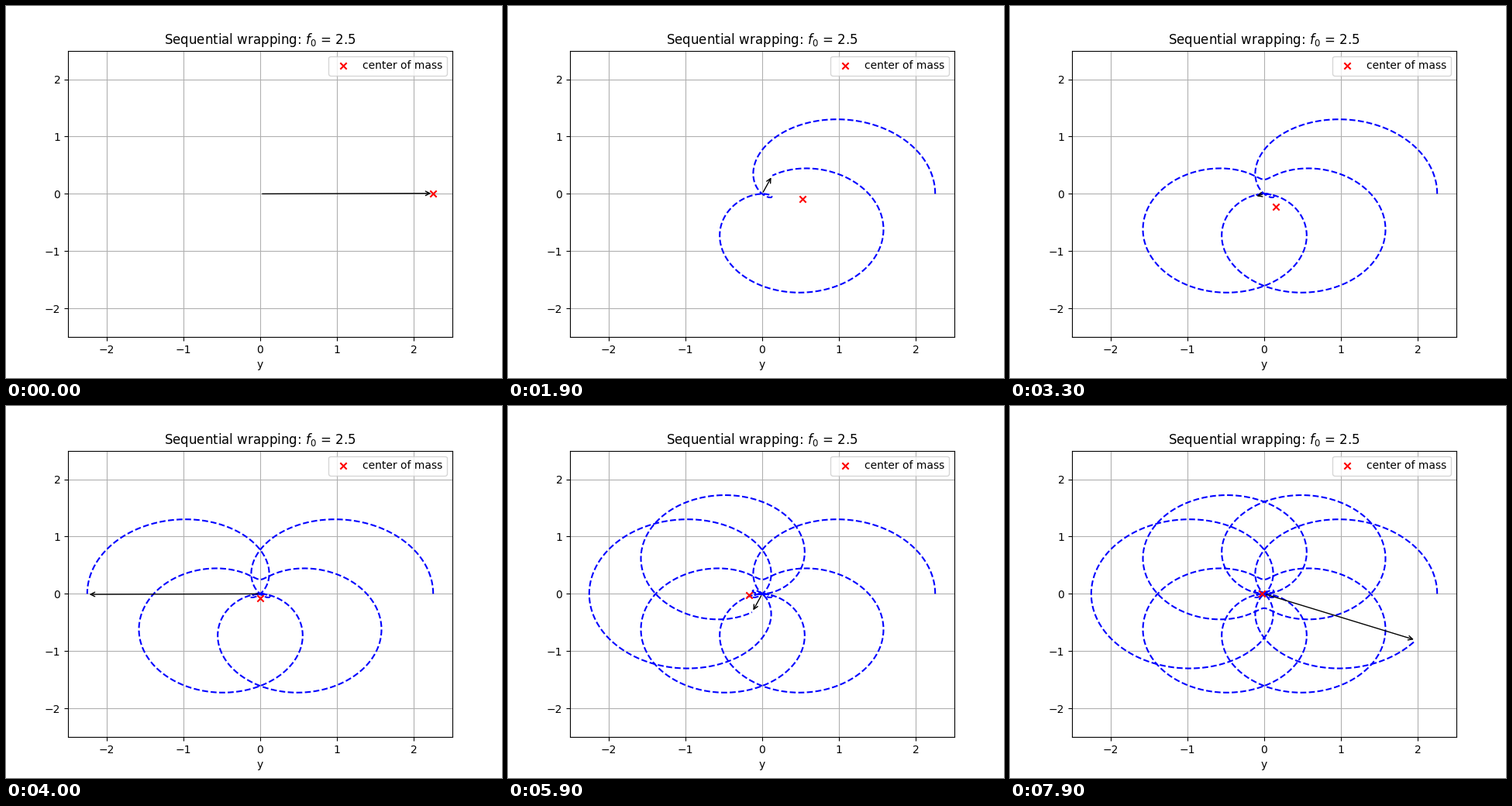
Write a matplotlib script that moves like this. It is 640x480 px and loops after 8000 ms.

```python
import numpy as np
import matplotlib.pyplot as plt
from matplotlib.animation import FuncAnimation

F0 = 2.5          # wrapping frequency
FRAMES = 80
STEP = 100        # samples per frame
DURATION = 2.0

t = np.arange(FRAMES * STEP + 1) * DURATION / (FRAMES * STEP)
signal = 1 + np.cos(2 * np.pi * 3 * t) + 0.25 * np.cos(2 * np.pi * 2 * t)
wrapped = signal * np.exp(2j * np.pi * F0 * t)
centers = np.cumsum(wrapped) / np.arange(1, len(t) + 1)

fig, ax = plt.subplots(figsize=(6.4, 4.8), dpi=100)
ax.set(xlim=(-2.5, 2.5), ylim=(-2.5, 2.5), xlabel="y",
       title=f"Sequential wrapping: $f_0$ = {F0}")
ax.set_xticks(range(-2, 3))
ax.set_yticks(range(-2, 3))
ax.grid(True)

curve, = ax.plot([], [], "b--", lw=1.5)
arrow = ax.annotate("", xy=(1, 0), xytext=(0, 0),
                    arrowprops=dict(arrowstyle="->"))
center = ax.scatter([0], [0], marker="x", color="red", zorder=4,
                    label="center of mass")
ax.legend(loc="upper right")


def update(frame):
    end = frame * STEP
    path = wrapped[:end + 1]
    tip = wrapped[end + 1]
    curve.set_data(path.real, path.imag)
    arrow.xy = (tip.real, tip.imag)
    center.set_offsets([[centers[end].real, centers[end].imag]])
    return curve, arrow, center


anim = FuncAnimation(fig, update, frames=FRAMES, interval=100,
                     repeat=True, repeat_delay=0)
plt.show()
```
